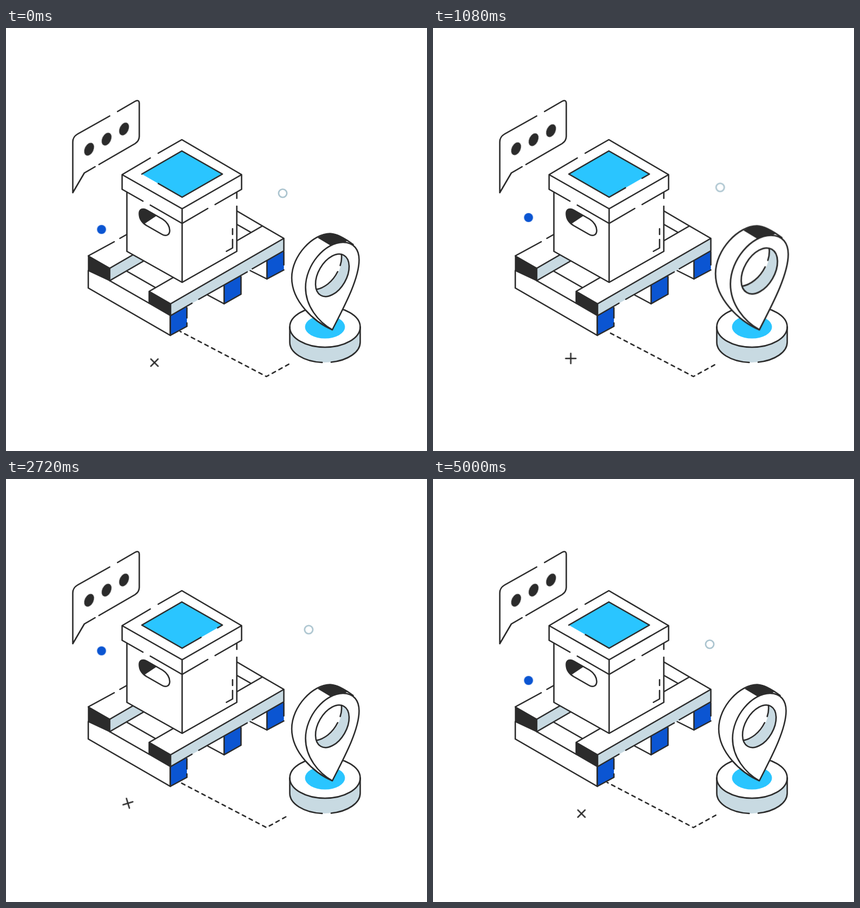
Animation of 747 by 750 pixels, one loop 5.04 s. Source, as an HTML page:

```html
<!DOCTYPE html>
<html lang="en">
<head>
<meta charset="utf-8">
<title>Delivery</title>
<style>
html, body { margin: 0; width: 100%; height: 100%; overflow: hidden; background: #fff; }
svg { display: block; width: 100%; height: 100%; }
.line { fill: none; stroke: #2b2b2b; stroke-width: 2.5; stroke-linecap: round; stroke-linejoin: round; }
.face { fill: #fff; }
.ink { fill: #2b2b2b; }
.blue { fill: #0b55d2; }
.sky { fill: #2ac5ff; }
.grey { fill: #c8dae2; }

svg * { animation: 5040ms linear infinite; }
.drift { animation-timing-function: cubic-bezier(.364, 0, .636, 1); }
#spot { animation-name: spot; }
#ring { animation-name: ring; }
#cross { animation-name: cross; }
#spin { animation-name: spin; }
#box { animation-name: box; transform-origin: 312.5px 451px; }
#pin { animation-name: pin; transform-origin: 579px 535px; }
#trim { animation-name: trim; stroke-dasharray: 298 32; stroke-linecap: butt; }
#route { animation-name: route; stroke-dasharray: 6.5 7; }
.hop { animation-name: hop; }
.hop:nth-child(2) { animation-delay: 240ms; }
.hop:nth-child(3) { animation-delay: 480ms; }

@keyframes spot {
  0%, 99.206%, 100% { transform: translate(169.5px, 357.2px); }
  49.603% { transform: translate(169.5px, 303.7px); }
}
@keyframes ring {
  0%, 99.206%, 100% { transform: translate(491px, 293px); }
  49.603% { transform: translate(538px, 266.6px); }
}
@keyframes cross {
  0%, 99.206%, 100% { transform: translate(263.4px, 593.3px); }
  49.603% { transform: translate(215.4px, 574.6px); }
}
@keyframes spin {
  0%, 99.206%, 100% { transform: rotate(45deg); }
  9.524% { transform: rotate(40deg); }
  21.429% { transform: rotate(0deg); }
  36.508% { transform: rotate(-25deg); }
  53.968% { transform: rotate(-17deg); }
  85.714% { transform: rotate(25deg); }
}
@keyframes box {
  0% { transform: translateY(0) rotate(0deg) scaleY(1); animation-timing-function: ease-in-out; }
  9.524% { transform: translateY(-8.3px) rotate(5.2deg) scaleY(1.006); animation-timing-function: ease-in-out; }
  20%, 28% { transform: translateY(0) rotate(0deg) scaleY(1); animation-timing-function: ease-in-out; }
  36.508% { transform: translateY(0) rotate(0deg) scaleY(1.009); animation-timing-function: ease-in-out; }
  45%, 100% { transform: translateY(0) rotate(0deg) scaleY(1); }
}
@keyframes pin {
  0% { transform: scale(1); animation-timing-function: cubic-bezier(.39, .575, .565, 1); }
  18.254% { transform: scale(1.083); animation-timing-function: cubic-bezier(.47, 0, .745, .715); }
  36.508%, 100% { transform: scale(1); }
}
@keyframes hop {
  0% { transform: translateY(0); animation-timing-function: ease-out; }
  4.762% { transform: translateY(-18px); animation-timing-function: ease-in; }
  9.524% { transform: translateY(0); animation-timing-function: ease-out; }
  11.905% { transform: translateY(3px); animation-timing-function: ease-in-out; }
  16.667% { transform: translateY(1px); }
  21.429% { transform: translateY(-1px); }
  27.778%, 100% { transform: translateY(0); }
}
@keyframes trim {
  0% { stroke-dashoffset: 83; }
  99.206%, 100% { stroke-dashoffset: -907; }
}
@keyframes route {
  0% { stroke-dashoffset: -9; }
  99.206%, 100% { stroke-dashoffset: 126; }
}
</style>
</head>
<body>
<svg viewBox="0 0 747 750">
  <defs>
    <ellipse id="hole" rx="25" ry="41" transform="rotate(30)"/>
    <clipPath id="holeClip"><use href="#hole" x="579" y="438.5"/></clipPath>
  </defs>

  <!-- speech bubble -->
  <path class="line" d="M184 156L127 188Q118.500 193 118.500 202V292L139 257L158 246M165 242L229 205Q236.500 200 236.500 192V134Q236.500 126 229 130L198 148"/>
  <g class="ink">
    <g class="hop"><ellipse rx="7.800" ry="12" transform="translate(147.500 215) rotate(26)"/></g>
    <g class="hop"><ellipse rx="7.800" ry="12" transform="translate(178.500 197) rotate(26)"/></g>
    <g class="hop"><ellipse rx="7.800" ry="12" transform="translate(209.500 179) rotate(26)"/></g>
  </g>

  <path id="route" class="line" d="M309 538L462 618L502 596"/>

  <!-- pallet -->
  <path class="grey" d="M184 426L260 382V404L184 448Z"/>
  <path class="line" d="M184 426L260 382M184 448L260 404M146 404L192 379M202 373L250 346"/>
  <path class="line" d="M146 430V461L291.500 545V510M184 448L254 488M214 431L284 471"/>
  <path class="line" d="M380 307L455 351M390 337L434 362"/>
  <path class="line" style="fill:#2b2b2b" d="M146.500 404.500L184 426V447.500L146.500 430Z"/>
  <path class="line" d="M358 473.500L387 489M433 430L463 445"/>
  <path class="blue" d="M291.500 510L321 494V529L291.500 545ZM387 456L417 439V472L387 489ZM463 412L493 395V429L463 445Z"/>
  <path class="line" d="M291.500 510V545L321 529V523M321 514V496M387 457V489L417 472V441M463 413V445L493 429M493 420V397"/>
  <path class="face" d="M254 467L455 351L493 373L292 489Z"/>
  <path class="grey" d="M292 489L493 373V395L292 510Z"/>
  <path class="ink" d="M254 467L292 489V510L254 488Z"/>
  <path class="line" d="M292 489L254 467L455 351L493 373L292 489V510L254 488V467M292 510L330 488M342 481L428 432.500M437 427L493 395V373"/>

  <!-- box -->
  <g id="box">
    <path class="face" d="M214.500 280V396L312.500 451L409.500 396V280Z"/>
    <path class="line" d="M214.500 290V396L312.500 451L409.500 396V316M409.500 302V290M312.500 346V451M402 356V366M402 375V390L391 396"/>
    <path class="face" d="M312.500 198L418 260V286L312.500 346L206 286V260Z"/>
    <path class="line" d="M256 230.500L206 260L312.500 320.500L418 260L312 198L270 222M206 260V286L243 307M256 314L312.500 346.500L358 320M371 313L418 286V260M312.500 320V346"/>
    <path class="sky" d="M312 218L384 259L312.500 300L241 259Z"/>
    <path id="trim" class="line" pathLength="330" d="M312 218L384 259L312.500 300L241 259Z"/>
    <path class="ink" d="M236 328C236 321 243 319 250 323L267 333L246 347C240 342 236 335 236 328Z"/>
    <path class="line" d="M236.500 329C236.500 321 243 319 250 323L278 339C286 344 290.500 352 290.500 359C290.500 367 284 370 277 366L249 350C241 345 236.500 337 236.500 329Z"/>
  </g>

  <!-- stand -->
  <path class="grey" d="M503.500 530V557A62.500 36 0 0 0 628.500 557V530Z"/>
  <ellipse class="face" cx="566" cy="530" rx="62.500" ry="36"/>
  <ellipse class="sky" cx="566" cy="530" rx="35.500" ry="20.500"/>
  <ellipse class="line" cx="566" cy="530" rx="62.500" ry="36"/>
  <path class="line" d="M503.500 530V557A62.500 36 0 0 0 561 593M577 592.500A62.500 36 0 0 0 628.500 557V530"/>

  <!-- pin -->
  <g id="pin">
    <path class="line" style="fill:#fff" d="M579 535C546 521 507 484 507 443C507 403 545 364.500 575 364.500C588 365 604 375 616 384L579 535Z"/>
    <path class="ink" d="M553 372C566 364 580 362 592 368L606 376Q604 380 597 380Q588 381 578 387Z"/>
    <path class="line" style="fill:#fff" d="M579 535C554 521 531.500 493 531.500 460C531.500 420 566 380 598 380C618 380 626.500 394 626.500 411C626.500 445 600 494 579 535Z"/>
    <g clip-path="url(#holeClip)">
      <use href="#hole" x="579" y="438.500" class="grey"/>
      <path class="face" d="M595 400C600 431 575 463 548 464L530 400Z"/>
      <path class="line" d="M595 400Q596.500 411 593 421M588.500 432C580 449 565 462 548 464"/>
    </g>
    <use href="#hole" x="579" y="438.500" class="line"/>
  </g>

  <!-- floating marks -->
  <circle id="spot" class="blue drift" r="8"/>
  <circle id="ring" class="drift" r="7.300" fill="none" stroke="#abc4cf" stroke-width="2.600"/>
  <g id="cross" class="drift"><path id="spin" class="line" d="M-9 0H9M0 -9V9"/></g>
</svg>
</body>
</html>
```
